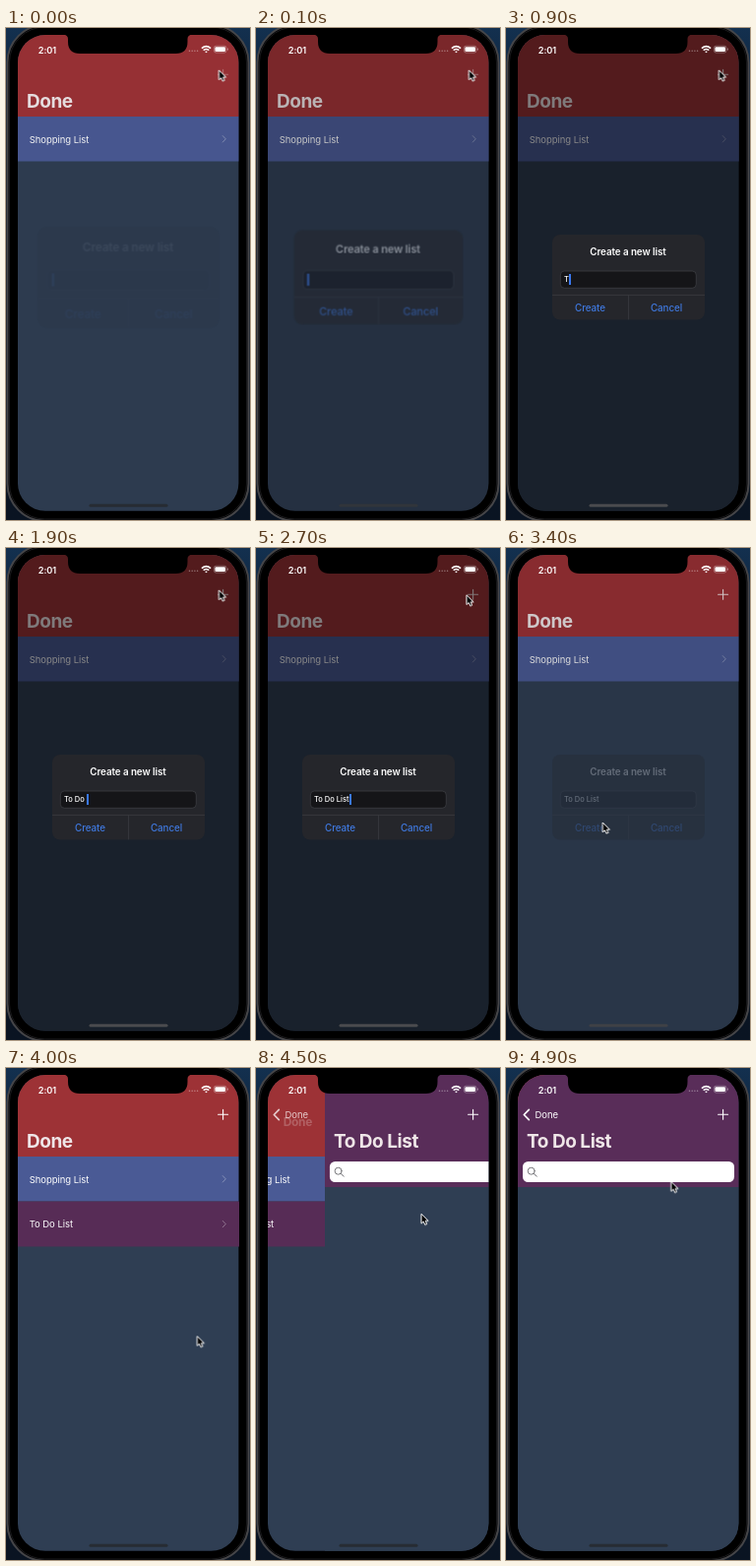
Animation of 248x500 px, one loop 5 s. Source, as an HTML page:

```html
<!DOCTYPE html>
<html lang="en">
<head>
<meta charset="utf-8">
<title>New list</title>
<style>
  html, body { margin: 0; width: 100%; height: 100%; overflow: hidden; background: linear-gradient(#13304f, #0a1626 30%, #0a1422); }
  svg { display: block; width: 248px; height: 500px; }
  text, .field { font-family: Inter, Roboto, sans-serif; fill: #fff; }

  .large { font-size: 19px; font-weight: 700; letter-spacing: -.025em; fill: #efe6e8; }
  .body { font-size: 9.5px; letter-spacing: -.005em; }
  .head { font-size: 9.9px; font-weight: 600; letter-spacing: -.01em; text-anchor: middle; }
  .button { font-size: 9.9px; font-weight: 500; letter-spacing: -.01em; text-anchor: middle; fill: #3f78de; }
  .line { fill: none; stroke: #fff; stroke-linecap: round; stroke-linejoin: round; }
  .field { font-size: 7.5px; font-weight: 500; line-height: 17px; height: 17px; color: #fff; white-space: pre; }
  .field::before { content: ""; animation: type 5s step-end infinite; }
  .caret { display: inline-block; width: 1.8px; height: 11px; margin-left: .3px; vertical-align: -2.5px;
    background: #3a78f0; animation: caret 5s step-end infinite; }

  .alert { transform-origin: 124.5px 253px; animation: alert 5s infinite; }
  .dim { animation: dim 5s infinite; }
  .added { animation: added 5s step-end infinite; }
  .plus { animation: plus 5s linear infinite; }
  .home { animation: home 5s linear infinite; }
  .pointer { animation: pointer 5s ease-in-out infinite; }
  .list, .detail, .list-title, .back {
    animation-duration: 5s; animation-iteration-count: infinite;
    animation-timing-function: cubic-bezier(.25, .75, .3, 1);
  }
  .list { animation-name: list; }
  .detail { animation-name: detail; }
  .list-title { transform-origin: 21px 80px; animation-name: list-title; }
  .back { animation-name: back; }

  @keyframes type {
    0% { content: ""; }
    18% { content: "T"; }
    22% { content: "To"; }
    26% { content: "To "; }
    30% { content: "To D"; }
    34% { content: "To Do"; }
    36% { content: "To Do "; }
    42% { content: "To Do L"; }
    46% { content: "To Do Li"; }
    48% { content: "To Do Lis"; }
    50%, 100% { content: "To Do List"; }
  }
  @keyframes caret {
    0% { opacity: 1; }
    14% { opacity: 0; }
    18% { opacity: 1; }
    60%, 100% { opacity: 0; }
  }
  @keyframes alert {
    0% { opacity: .06; transform: scale(1.19); animation-timing-function: ease-out; }
    7% { opacity: 1; transform: none; }
    66.2% { opacity: 1; animation-timing-function: linear; }
    68% { opacity: .27; animation-timing-function: ease-out; }
    72%, 100% { opacity: 0; transform: none; }
  }
  @keyframes dim {
    0% { opacity: .04; animation-timing-function: ease-out; }
    7%, 66.2% { opacity: .47; animation-timing-function: linear; }
    68% { opacity: .14; animation-timing-function: ease-out; }
    72%, 100% { opacity: 0; }
  }
  @keyframes added { 0% { opacity: 0; } 70%, 100% { opacity: 1; } }
  @keyframes plus { 0% { opacity: .3; } 7%, 68% { opacity: .85; } 72%, 100% { opacity: 1; } }
  @keyframes home {
    0% { fill: #272c33; }
    7%, 66.2% { fill: #4a4b4e; }
    72%, 100% { fill: #272c33; }
  }
  @keyframes pointer {
    0%, 53% { transform: translate(216.4px, 42.8px); }
    63%, 70% { transform: translate(98.3px, 279px); }
    79%, 80% { transform: translate(194.3px, 272.5px); }
    85%, 88% { transform: translate(168px, 152px); }
    97%, 100% { transform: translate(167.8px, 115.5px); }
  }
  @keyframes list { 0%, 87% { transform: none; } 97%, 100% { transform: translateX(-67px); } }
  @keyframes detail { 0%, 87% { transform: translateX(226px); } 97%, 100% { transform: none; } }
  @keyframes list-title {
    0%, 87% { opacity: 1; transform: none; }
    97%, 100% { opacity: 0; transform: translate(9px, -29px) scale(.5); }
  }
  @keyframes back { 0%, 87% { opacity: 0; } 97%, 100% { opacity: 1; } }
</style>
</head>
<body>
<svg viewBox="0 0 248 500">
  <defs>
    <clipPath id="screen"><rect x="12" y="7" width="224.4" height="483.8" rx="28"/></clipPath>
    <path id="more" class="line" d="M220.3 109.6l3 3.2-3 3.2" stroke-opacity=".33"/>
  </defs>

  <rect x="1.5" y="-3" width="245" height="504" rx="38" fill="#050506" stroke="#454548" stroke-width="2"/>
  <rect x="3.5" y="-1" width="241" height="500" rx="36" fill="#000" stroke="#18181a"/>

  <g clip-path="url(#screen)">
    <rect x="12" y="7" width="225" height="484" fill="#2f3e53"/>
    <g class="list">
      <rect x="12" y="7" width="225" height="83" fill="#9d3236"/>
      <rect x="12" y="90" width="225" height="45.5" fill="#4a5a95"/>
      <text class="body" x="23.7" y="116.6">Shopping List</text>
      <use href="#more"/>
      <g class="added">
        <rect x="12" y="135.5" width="225" height="46" fill="#572c56"/>
        <text class="body" x="23.7" y="162.4">To Do List</text>
        <use href="#more" y="45.8"/>
      </g>
    </g>
    <g class="detail">
      <rect x="12" y="7" width="225" height="484" fill="#2f3e53"/>
      <rect x="12" y="7" width="225" height="114" fill="#592d59"/>
      <text class="large" x="21" y="80.5">To Do List</text>
      <rect x="17" y="95" width="215" height="21" rx="5.5" fill="#fff"/>
      <g style="fill:none;stroke:#77777b;stroke-linecap:round">
        <circle cx="25.7" cy="104.7" r="3.5"/>
        <path d="M28.4 107.4l2.8 2.8"/>
      </g>
    </g>
    <text class="large list-title" x="21" y="80.5">Done</text>
    <g class="back">
      <path class="line" d="M23.3 42.3l-5 5.2 5 5.2" stroke-width="1.7"/>
      <text class="body" x="29.5" y="51">Done</text>
    </g>
    <path class="line plus" d="M215.6 47.3h10M220.6 42.3v10" stroke-width="1.1"/>

    <rect class="dim" x="12" y="7" width="225" height="484"/>

    <g class="alert">
      <rect x="47" y="210" width="155" height="86.5" rx="8" fill="#25262b"/>
      <text class="head" x="124" y="230.8">Create a new list</text>
      <rect x="55.3" y="247" width="138" height="17.3" rx="4" fill="#151518" stroke="#3d3e43" stroke-width=".8"/>
      <foreignObject x="59" y="247.4" width="130" height="17">
        <div class="field"><i class="caret"></i></div>
      </foreignObject>
      <path d="M47 271.4h155M124.6 271.4v25" stroke="#3c3d42" stroke-width=".8"/>
      <text class="button" x="85.5" y="288">Create</text>
      <text class="button" x="163" y="288">Cancel</text>
    </g>
    <rect class="home" x="84.5" y="483.7" width="80" height="3" rx="1.5"/>
  </g>

  <path d="M58 6.5Q63 7 63 11V14Q63 26 75 26H172.5Q184.5 26 184.5 14V11Q184.5 7 189.5 6.5Z"/>

  <text x="32.8" y="25.6" font-size="9.2" font-weight="600" letter-spacing="-.1">2:01</text>
  <path class="line" d="M186.5 23.2h9" stroke-width="1.5" stroke-opacity=".4" stroke-dasharray="0 2.7"/>
  <g class="line" stroke-width="1.5" style="stroke-linecap:butt">
    <path d="M198.9 20.6q4.6-4 9.2 0M200.7 22.6q2.8-2.3 5.6 0"/>
    <path d="M202.1 23.9q1.4-1 2.8 0l-1.4 1.4z" fill="#fff" stroke="none"/>
  </g>
  <rect x="211.4" y="18.2" width="12.6" height="6.8" rx="2" fill="none" stroke="#fff" stroke-opacity=".45" stroke-width=".7"/>
  <rect x="212.4" y="19.2" width="10.6" height="4.8" rx="1.2" fill="#fff"/>
  <path class="line" d="M225.3 21v1.2" stroke-width=".9" stroke-opacity=".5"/>

  <path class="pointer" d="M0 0V9.8L2.2 7.8 3.8 11.2 5.7 10.4 4.2 7.1H7.2Z" fill="#000" stroke="#fff" stroke-linejoin="round"/>
</svg>
</body>
</html>
```
